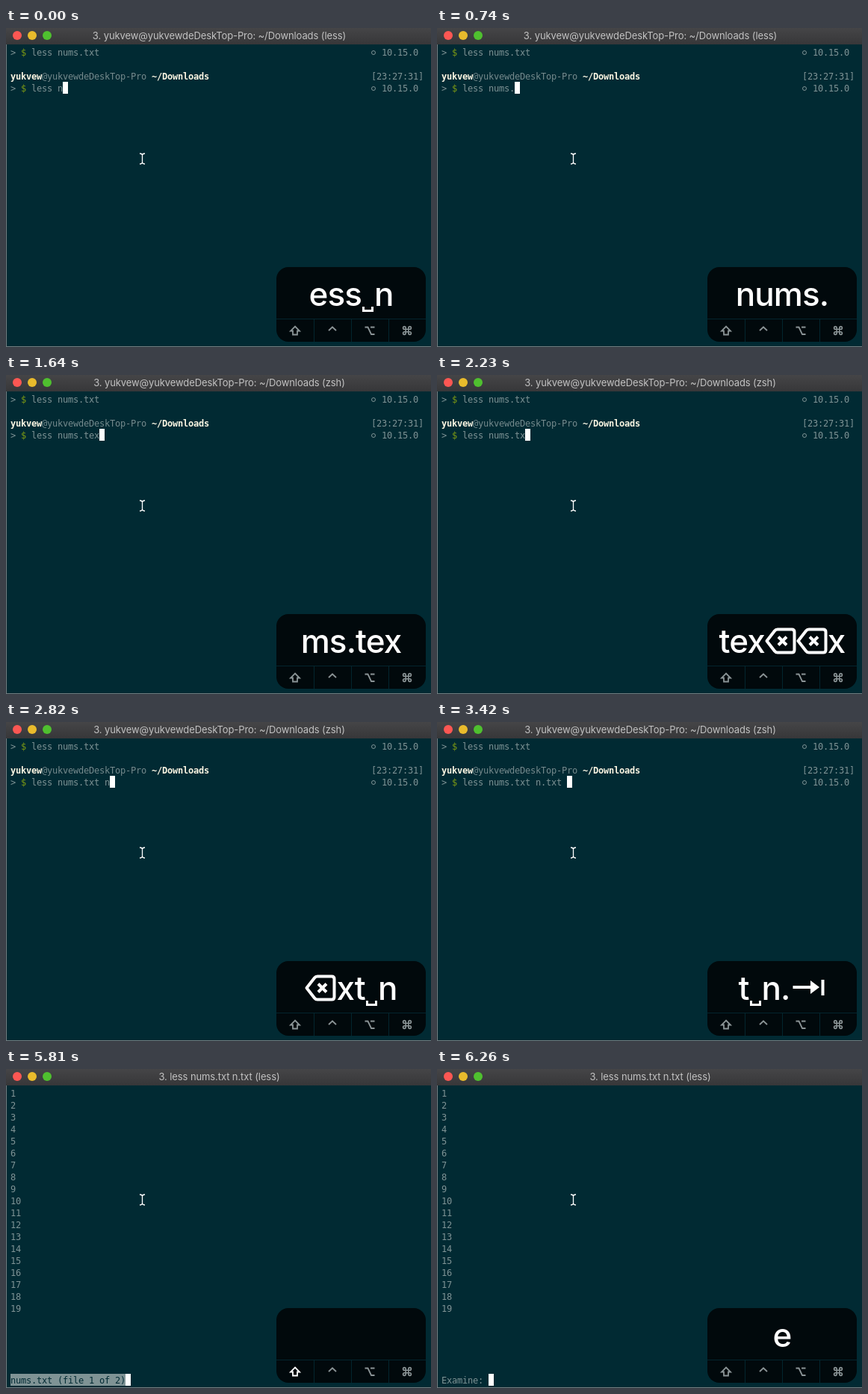
Write an HTML page that moves like this. It is 569 by 427 pixels and loops after 8 s.

```html
<!DOCTYPE html>
<html lang="en">
<head>
<meta charset="utf-8">
<title>Terminal</title>
<style>
  html, body { margin: 0; width: 100%; height: 100%; overflow: hidden; background: #012a33; }
  #stage { position: relative; width: 569px; height: 427px; overflow: hidden; }
  #stage > * { position: absolute; }
  #bar { left: 0; top: 0; width: 569px; height: 22px; background: linear-gradient(#454547, #373739); }
  #title { left: 0; top: 0; width: 571px; text-align: center; color: #c2c2c2; white-space: nowrap;
    font: 13px/21px Inter, Roboto, sans-serif; letter-spacing: -.1px; }
  .light { top: 4px; width: 12px; height: 12px; border-radius: 50%; }
  #edge { left: 0; top: 22px; width: 568px; height: 404px; border: solid #737d80; border-width: 0 0 1px 1px; }
  #term { left: 6px; top: 25px; margin: 0; color: #7f9395;
    font: 12px/16px "DejaVu Sans Mono", monospace; letter-spacing: -.2246px; }
  #term b { color: #fdf6e3; }
  #term u { color: #7d9a14; text-decoration: none; }
  #term s { color: #768a8d; text-decoration: none; }
  #term i { display: inline-block; box-sizing: border-box; width: 6px; height: 6px; margin-right: 1px;
    border: 1.2px solid #7f9395; border-radius: 50%; vertical-align: 1px; }
  #term mark { background: #7f9395; color: #012a33; display: inline-block; vertical-align: top;
    height: 15px; margin-top: -1px; padding-top: 1px; }
  #cursor { width: 7px; height: 16px; background: #fff; }
  #panel { left: 362px; top: 320px; width: 200px; height: 100px; border-radius: 16px; background: #01090c; overflow: hidden; }
  #keys { position: absolute; top: 6px; width: 200px; text-align: center; white-space: nowrap; color: #fff;
    font: 500 44px/60px Inter, Roboto, sans-serif; letter-spacing: -.9px; }
  #keys svg { height: 33px; overflow: visible; vertical-align: baseline; fill: none; stroke: #fff; stroke-width: 4; }
  #mods { position: absolute; left: 0; top: 0; fill: none; stroke: #8b9496; stroke-width: 1.8; }
</style>
</head>
<body>
<div id="stage">
  <div id="edge"></div>
  <div id="bar"></div>
  <div class="light" style="left:9px;background:#fc5753"></div>
  <div class="light" style="left:29px;background:#e9bb2c"></div>
  <div class="light" style="left:49px;background:#4fc02f"></div>
  <div id="title"></div>
  <pre id="term"></pre>
  <div id="cursor"></div>
  <svg style="left:175.5px;top:165px" width="13" height="20" fill="none">
    <path d="M3 3q3 0 3.5 2q.5-2 3.5-2M6.5 5V15M3 17q3 0 3.5-2q.5 2 3.5 2" stroke="#fff" stroke-width="1.3"/>
  </svg>
  <div id="panel">
    <div id="keys"></div>
    <svg id="mods" width="200" height="100">
      <path d="M0 69.5H200M50.5 69V100M100.5 69V100M150.5 69V100" stroke="#03252e" stroke-width="1"/>
      <path id="shift" d="M25 79.5L31 85.5H28V90.5H22V85.5H19Z"/>
      <path d="M70 85L75 80.3L80 85"/>
      <path d="M118.5 80.5H122.5L127 90H131.5M126 80.5H131.5"/>
      <path d="M173.2 83.2V81.4a1.8 1.8 0 1 0-1.8 1.8H178.6a1.8 1.8 0 1 0-1.8-1.8V88.6a1.8 1.8 0 1 0 1.8-1.8H171.4a1.8 1.8 0 1 0 1.8 1.8Z" stroke-width="1.6"/>
    </svg>
  </div>
</div>
<script>
const $ = id => document.getElementById(id);
const LOOP = 8000, CELL = 7, LINE = 16;
const USER = 'yukvew', HOST = USER + 'deDeskTop-Pro';
const SHELL = `3. ${USER}@${HOST}: ~/Downloads`, PAGER = '3. less nums.txt n.txt';

const icon = (width, shapes) => `<svg width="${width}">${shapes}</svg>`;
const ICONS = {
  '␣': icon(17, '<path d="M2.5 34V39.5H14.5V34" stroke-width="3"/>'),
  '⌫': icon(42, '<path d="M2.5 17L13 3.5Q14.5 1.5 17 1.5H36Q39.5 1.5 39.5 5V29Q39.5 32.5 36 32.5H17Q14.5 32.5 13 30.5ZM18 11.5L29 22.5M29 11.5L18 22.5" stroke-linejoin="round"/>'),
  '⇥': icon(48, '<path d="M3.5 16H30M43.5 6V27"/><path d="M27 7L39 16L27 25Z" fill="#fff" stroke="none"/>'),
  '↩': icon(50, '<path d="M12 17H31A10 10 0 0 0 31-3H29"/><path d="M16 8L4 17L16 26Z" fill="#fff" stroke="none"/>')
};

// time, typed text (or pager status), keys shown, title, shift held
const steps = [
  [0, 'n', 'ess␣n', SHELL + ' (less)'],
  [150, 'nu', 'ss␣nu'],
  [450, 'num', 's␣num'],
  [600, 'nums', '␣nums'],
  [740, 'nums.', 'nums.'],
  [1040, 'nums.t', 'nums.t'],
  [1190, 'nums.te', 'ums.te'],
  [1490, 'nums.tex', 'ms.tex'],
  [1640, 'nums.tex', 'ms.tex', SHELL + ' (zsh)'],
  [1940, 'nums.te', 's.tex⌫'],
  [2080, 'nums.t', '.tex⌫⌫'],
  [2230, 'nums.tx', 'tex⌫⌫x'],
  [2380, 'nums.txt', 'ex⌫⌫xt'],
  [2520, 'nums.txt ', '⌫⌫xt␣'],
  [2820, 'nums.txt n', '⌫xt␣n'],
  [3120, 'nums.txt n.', 'xt␣n.'],
  [3420, 'nums.txt n.txt ', 't␣n.⇥'],
  [4460, 'nums.txt (file 1 of 2)', '␣n.⇥↩', PAGER + ' (zsh)'],
  [5210, 'nums.txt (file 1 of 2)', '␣n.⇥↩', PAGER + ' (less)'],
  [5810, 'nums.txt (file 1 of 2)', '', , true],
  [5960, ':', ':', , true],
  [6110, ':', 'e'],
  [6260, 'Examine: ', 'e']
];
const PAGER_START = 4460;

const command = text => `> <u>$</u> less ${text.padEnd(60)}<i></i> 10.15.0\n`;
const shell = text => command('nums.txt') + '\n' +
  `<b>${USER}</b><s>@${HOST}</s> <b>~/Downloads</b>${' '.repeat(31)}[23:27:31]\n` + command(text);
const pager = status => Array.from({ length: 24 }, (_, i) => i < 19 ? i + 1 : '').join('\n') + '\n' +
  (status.includes('file') ? `<mark>${status}</mark>` : status);

function show(n) {
  const [time, text, keys, , shift] = steps[n];
  const paging = time >= PAGER_START;
  $('term').innerHTML = paging ? pager(text) : shell(text);
  $('title').textContent = steps.slice(0, n + 1).filter(s => s[3]).pop()[3];
  $('keys').innerHTML = [...keys].map(k => ICONS[k] || k).join('');
  $('shift').style.stroke = shift ? '#fff' : '';
  $('cursor').style.left = 6 + CELL * (text.length + (paging ? 0 : 9)) + 'px';
  $('cursor').style.top = 24 + LINE * (paging ? 24 : 3) + 'px';
}

let current = -1;
function frame() {
  const t = performance.now() % LOOP;
  const n = steps.filter(s => s[0] <= t).length - 1;
  if (n !== current) show(current = n);
  requestAnimationFrame(frame);
}
frame();
</script>
</body>
</html>
```
